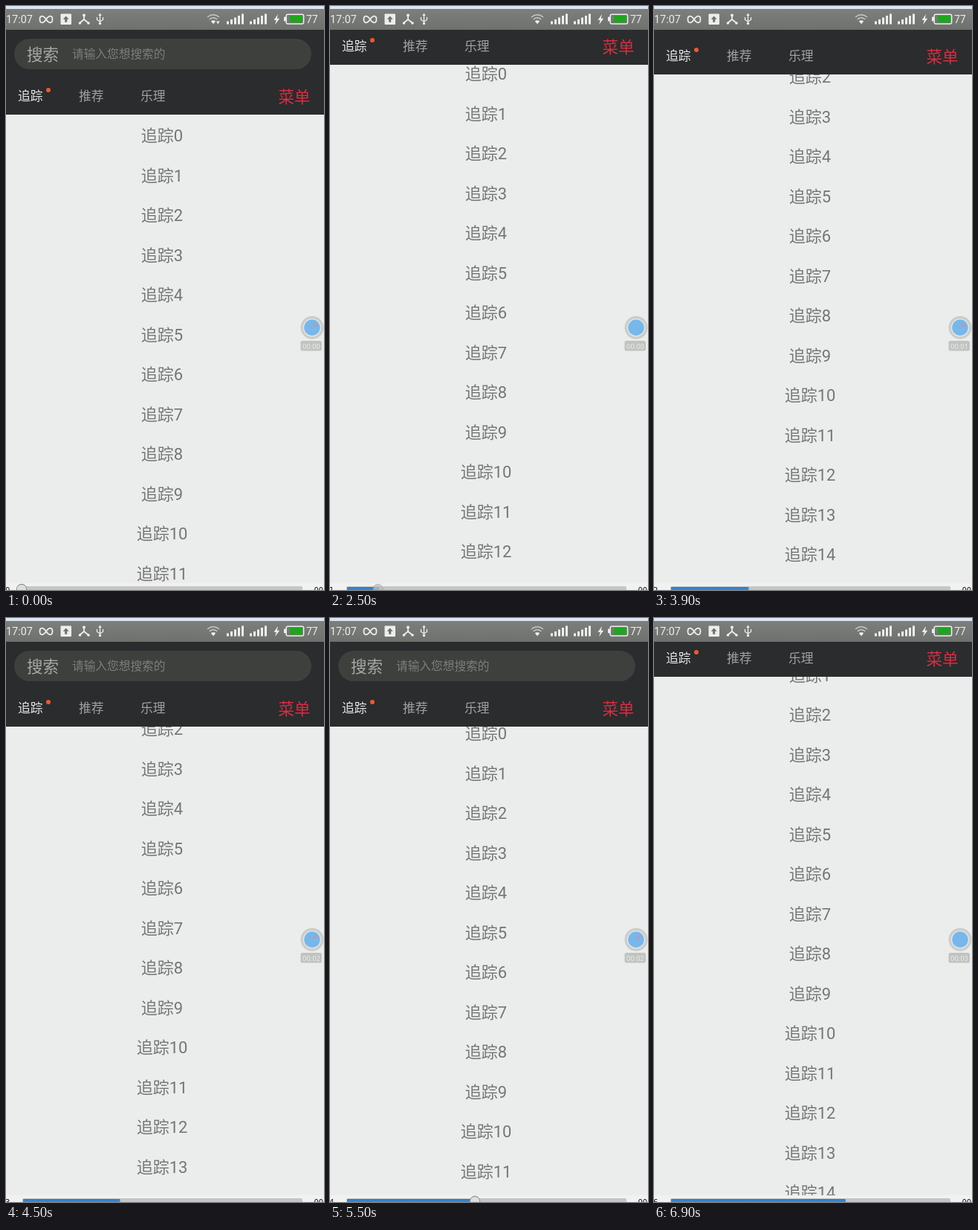
These frames come from a looping animation (428 by 785 pixels, 7000 ms). An HTML page with a canvas:

```html
<!DOCTYPE html>
<html lang="zh">
<head>
<meta charset="utf-8">
<title>List with collapsing header</title>
<style>
html, body { margin: 0; width: 100%; height: 100%; overflow: hidden; background: #ebedec; }
canvas { display: block; width: 428px; height: 785px; }
</style>
</head>
<body>
<canvas id="stage"></canvas>
<script>
const W = 428, H = 785, LOOP = 7000, STEP = 100;
const HEAD = 146;      // bottom of the open header
const FOLD = 67;       // height of the search row that folds away
const TURN = 132;      // list position once the header is open again
const ROW = 53.5;
const FONT = 'Roboto, "Noto Sans CJK SC", "Noto Sans CJK", sans-serif';
const canvas = document.getElementById('stage');
const ctx = canvas.getContext('2d');
const dpr = window.devicePixelRatio || 1;
canvas.width = W * dpr;
canvas.height = H * dpr;

// time, distance dragged
const drag = [[0, 0], [1300, 0], [1600, 30], [2500, 83], [3200, 132], [3750, 199],
  [4500, 132], [5500, 19], [5900, 0], [6300, 0], [6900, 151], [7000, 151]];

function at(keys, t) {
  let i = 1;
  while (i < keys.length - 1 && t > keys[i][0]) i++;
  const [t0, a] = keys[i - 1], [t1, b] = keys[i];
  return a + (b - a) * (t - t0) / (t1 - t0);
}

function text(s, x, y, size, color, align = 'left') {
  ctx.font = `${size}px ${FONT}`;
  ctx.textAlign = align;
  ctx.fillStyle = color;
  ctx.fillText(s, x, Math.round(y + size * 0.37));
}

function rect(x, y, w, h, color) {
  ctx.fillStyle = color;
  ctx.fillRect(x, y, w, h);
}

function pill(x, y, w, h, r, color) {
  ctx.fillStyle = color;
  ctx.beginPath();
  ctx.roundRect(x, y, w, h, r);
  ctx.fill();
}

function disc(x, y, r, color) {
  ctx.fillStyle = color;
  ctx.beginPath();
  ctx.arc(x, y, r, 0, Math.PI * 2);
  ctx.fill();
}

function line(d, width, color) {
  ctx.strokeStyle = color;
  ctx.lineWidth = width;
  ctx.stroke(new Path2D(d));
}

function shape(d, color) {
  ctx.fillStyle = color;
  ctx.fill(new Path2D(d));
}

function drawList(shift, top) {
  ctx.save();
  ctx.beginPath();
  ctx.rect(0, top, W, 776 - top);
  ctx.clip();
  for (let i = 0; i < 18; i++) {
    const y = Math.floor(174.6 + i * ROW) - shift;
    if (y > top - 15 && y < 790) text('追踪' + i, 210, y, 22, '#757675', 'center');
  }
  ctx.restore();
}

function drawHeader(fold) {
  ctx.save();
  ctx.beginPath();
  ctx.rect(0, 32, W, H);
  ctx.clip();
  ctx.translate(0, -fold);
  rect(0, 32, W, HEAD - 32, '#2a2c2d');
  pill(11, 44, 400, 41, 20.5, '#3e403e');
  text('搜索', 28, 65, 21.5, '#a6a8a6');
  text('请输入您想搜索的', 89, 64.5, 15.7, '#7c7e7c');
  text('追踪', 16, 121, 16.8, '#e6e8e6');
  text('推荐', 98, 121, 16.8, '#a0a2a0');
  text('乐理', 181, 121, 16.8, '#a0a2a0');
  text('菜单', 366.5, 122, 21.5, '#dc2c40');
  disc(57, 113, 3, '#f0582c');
  ctx.restore();
}

function drawStatus(busy) {
  const ink = '#eceeec', soft = '#c6c8c6';
  rect(0, 0, W, 4, '#dce6f2');
  const g = ctx.createLinearGradient(0, 4, 0, 32);
  g.addColorStop(0, '#7c7f7c');
  g.addColorStop(1, '#6e716e');
  rect(0, 4, W, 28, g);
  text('17:07', 0, 17.5, 14.4, ink);

  line('M54 18C50 12 45.5 12.5 45.5 18S50 24 54 18S62.5 12.5 62.5 18S58 24 54 18', 1.8, ink);
  pill(73.5, 10.5, 14.5, 14.5, 1, ink);
  shape('M80.7 13.5l4 4.3h-2.5v4h-3v-4h-2.5z', '#6e716e');
  line('M105 12V18L99 23M105 18L111 23', 1.8, ink);
  disc(105, 12.5, 2, ink);
  disc(99.5, 23, 1.8, ink);
  disc(111, 23, 1.8, ink);
  line('M126.5 12V24M122.5 15V18.5L126.5 21L130.5 18.5V15', 1.3, ink);
  shape('M126.5 9.5l2.2 3.5h-4.4z', ink);
  disc(126.5, 23.5, 1.7, ink);

  line('M271 15Q279 8.5 287 15', 1.5, soft);
  line('M273.8 18Q279 13.6 284.2 18', 1.5, soft);
  shape('M275.8 20.6Q279 18 282.2 20.6L279 24.3z', ink);
  if (busy) shape('M283 20.5h4.6l-2.3 4z', ink);
  for (const x of [297, 328]) {
    for (let i = 0; i < 5; i++) {
      const h = 4 + i * 2.5;
      rect(x + i * 5, 24.5 - h, 3, h, ink);
    }
  }
  shape('M366 11l-5.5 8h3.2l-1.5 6 6-8.2h-3.4z', ink);
  pill(374, 14.5, 3, 6, 1, ink);
  ctx.strokeStyle = ink;
  ctx.lineWidth = 1.5;
  ctx.beginPath();
  ctx.roundRect(377.2, 11.2, 23.4, 12.8, 2);
  ctx.stroke();
  rect(382, 13, 17, 9.2, '#1fa51f');
  text('77', 404, 17.5, 14, ink);
}

function drawRecorder(t, hand) {
  const sec = t < 2800 ? 0 : t < 4200 ? 1 : t < 5600 ? 2 : 3;
  disc(412, 432.3, 15.5, '#cbcdcc');
  disc(412, 432.3, 12.3, '#dfe3e3');
  disc(412, 432.3, 10.7, '#76b7ec');
  if (hand) shape('M413 431.5l1.5-4.5 4.5-.5-1 3.5z', '#c596a4');
  pill(396.5, 450, 28.5, 13.5, 2.5, '#c1c3c1');
  text('00:0' + sec, 411, 457, 9.6, '#e9ebe9', 'center');
}

function drawPlayer(t) {
  const x = 22 + Math.max(0, t - 1500) * 0.0435;
  rect(0, 776, W, 9, '#f0f1f0');
  pill(22, 780, 377, 9, 2, '#c4c5c4');
  if (t > 1500) {
    const g = ctx.createLinearGradient(0, 781, 0, 785);
    g.addColorStop(0, '#2f79bd');
    g.addColorStop(1, '#2f8fe6');
    pill(23, 781, x - 22, 8, 1, g);
  }
  const played = Math.max(0, Math.floor((t - 1500) / 890));
  ctx.font = '10px "DejaVu Sans", sans-serif';
  ctx.fillStyle = '#111';
  ctx.textAlign = 'left';
  ctx.fillText(played, -1, 788.5);
  ctx.fillText('00', 414.5, 788.5);

  let alpha = 0;
  if (t < 2700) alpha = at([[0, 1], [2300, 1], [2700, 0]], t);
  else if (t > 5200 && t < 6000) alpha = at([[5200, 0], [5400, 1], [5700, 1], [6000, 0]], t);
  if (!alpha) return;
  const knob = Math.max(21, x - 1);
  ctx.globalAlpha = alpha;
  disc(knob, 784, 7.2, '#858685');
  disc(knob, 784, 6.2, '#dcdddc');
  ctx.globalAlpha = 1;
}

function draw(t) {
  const shift = Math.round(at(drag, t));
  // pulling back opens the header before the list moves
  const back = t > 3750 && t < 5950;
  const fold = back ? Math.max(0, shift - TURN) : Math.min(FOLD, shift);
  ctx.setTransform(dpr, 0, 0, dpr, 0, 0);
  rect(0, 0, W, H, '#ebedec');
  drawList(shift, HEAD - fold);
  drawHeader(fold);
  drawStatus(t < 2200);
  drawRecorder(t, fold < FOLD);
  drawPlayer(t);
}

const start = performance.now();
function tick() {
  const t = (performance.now() - start) % LOOP;
  draw(Math.floor(t / STEP) * STEP);
  requestAnimationFrame(tick);
}
tick();
</script>
</body>
</html>
```
